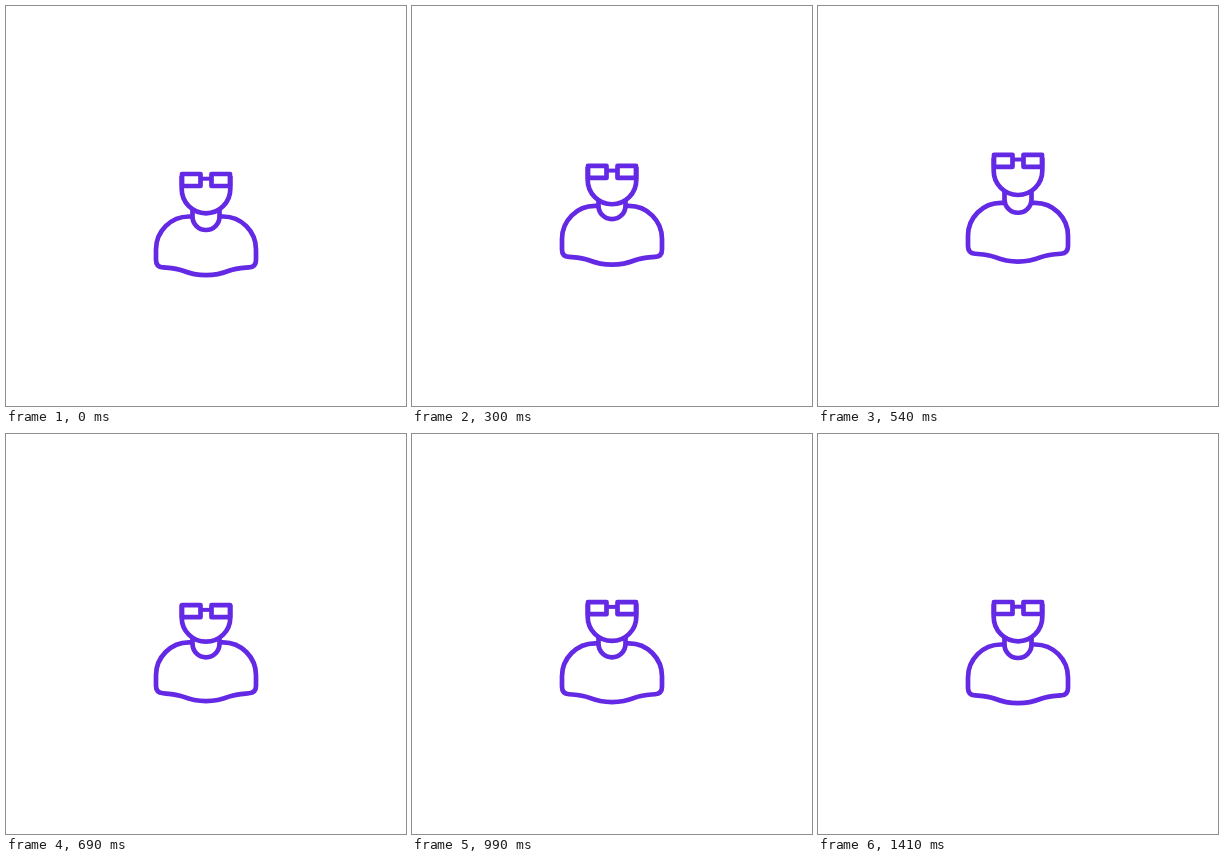
Recreate the animation shown at these times as an HTML page. Size 400x400 px, loop 1530 ms.

```html
<!DOCTYPE html>
<html lang="en">
<head>
<meta charset="utf-8">
<title>Jumping figure</title>
<style>
  html, body { margin: 0; width: 100%; height: 100%; overflow: hidden; background: #fff; }
  svg { display: block; width: 100vw; height: 100vh; }
</style>
</head>
<body>
<svg viewBox="0 0 400 400" fill="#fff" stroke="#6429e4" stroke-width="4.7" stroke-linejoin="round">
  <path id="body" d="M200 210.500H183a33 33 0 0 0 -33 33V254q0 7 7 7.400c6 .6 13 .8 20 3.400q11 4.400 23 4.400t23 -4.400c7 -2.600 14 -2.800 20 -3.400q7 -.4 7 -7.400v-10.500a33 33 0 0 0 -33 -33z"/>
  <path id="neck" d="M186.500 198v12.500a13.500 13.500 0 0 0 27 0V198"/>
  <path id="face" d="M175.700 170v13a24.300 24.300 0 0 0 48.600 0v-13"/>
  <g id="glasses" fill="none">
    <path d="M194.500 172.700h11" stroke-width="4"/>
    <path d="M176 168h18.500v12H176zM205.500 168H224v12h-18.500z"/>
  </g>
</svg>
<script>
const LOOP = 1530, STEP = 30;
const CROUCH = 70, LAND = 840, REBOUND = 1030, SETTLE = 1200, REST = 1410;

// Higher parts sink deeper, rise further and reach the top later.
const parts = [
  { id: 'body', sink: 4.3, rise: 17, top: 435 },
  { id: 'neck', sink: 9, rise: 21, top: 450 },
  { id: 'face', sink: 12, rise: 21.5, top: 465, stretch: 0.035 },
  { id: 'glasses', sink: 17, rise: 23, top: 465, stretch: 0 }
];

// Eased step from 0 to 1 between two times.
function ease(t, from, to) {
  const u = Math.min(1, Math.max(0, (t - from) / (to - from)));
  return (1 - Math.cos(Math.PI * u)) / 2;
}

function offset({ sink, rise, top }, t) {
  const bounce = 1.8, dip = 0.6;
  return sink * ease(t, 0, CROUCH)
    - (sink + rise) * ease(t, CROUCH, top)
    + (sink + rise) * ease(t, top, LAND)
    - (sink + bounce) * ease(t, LAND, REBOUND)
    + (bounce + dip) * ease(t, REBOUND, SETTLE)
    - dip * ease(t, SETTLE, REST);
}

function draw(now) {
  const t = Math.floor((now % LOOP) / STEP) * STEP;
  for (const part of parts) {
    const y = offset(part, t);
    const squash = Math.max(0, y / part.sink) ** 3;
    const width = 1 + (part.stretch ?? 0.028) * squash;
    document.getElementById(part.id)
      .setAttribute('transform', `translate(200 ${y}) scale(${width} 1) translate(-200 0)`);
  }
}

const start = performance.now();
function tick() {
  draw(performance.now() - start);
  requestAnimationFrame(tick);
}
tick();
</script>
</body>
</html>
```
